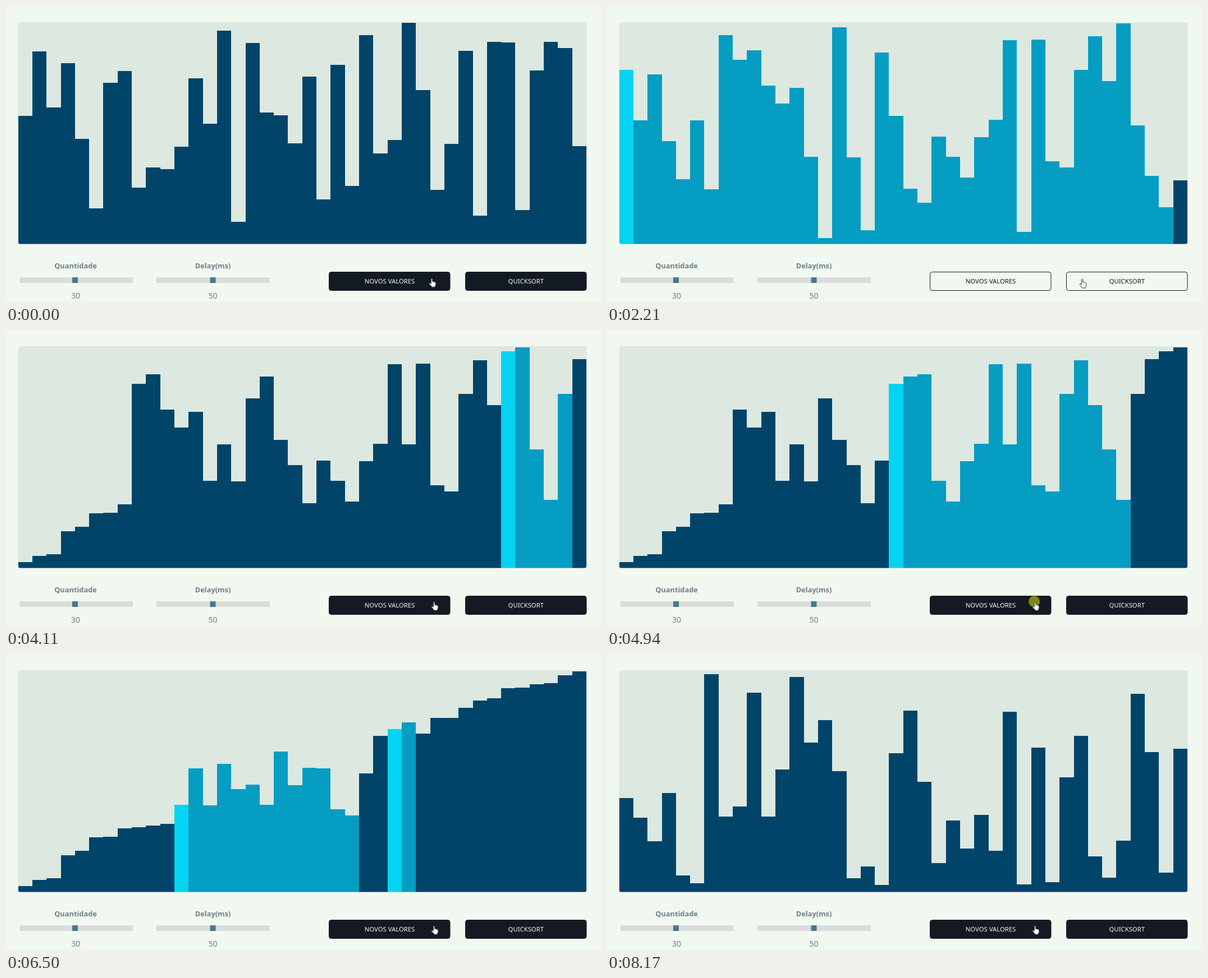
Animation of 1060 by 528 pixels, one loop 8.72 s. Source, as an HTML page:

```html
<!DOCTYPE html>
<html lang="pt">
<head>
<meta charset="utf-8">
<title>Quicksort</title>
<style>
  html, body { margin: 0; width: 100%; height: 100%; overflow: hidden; background: #f1f8f0; }
  svg { display: block; width: 100%; height: 100%; font-family: "Noto Sans", "Open Sans", sans-serif; text-anchor: middle; }
  .label { font-size: 12.8px; font-weight: 700; fill: #6f7f89; }
  .value { font-size: 14px; fill: #6f7f89; }
  .track { fill: #dbdcdb; }
  .thumb { fill: #467890; }
  .btn rect { fill: #141a23; stroke: #141a23; }
  .btn text { font-size: 11.3px; font-weight: 500; fill: #f1f8f0; }

  .cursor, .click, .btn * { animation: 8720ms linear infinite; }
  .cursor { animation-name: move; }
  .click { animation-name: click; animation-timing-function: step-end; opacity: 0; }
  .btn * { animation-timing-function: ease-in-out; }
  .novos rect { animation-name: novos-box; }
  .novos text { animation-name: novos-text; }
  .quick rect { animation-name: quick-box; }
  .quick text { animation-name: quick-text; }

  @keyframes move {
    0% { transform: translate(758.5px, 485.5px); }
    11.6% { transform: translate(758.5px, 485.5px); animation-timing-function: ease-in-out; }
    22.1%, 31% { transform: translate(846.6px, 487px); }
    32.7% { transform: translate(816px, 486.8px); }
    33.43% { transform: translate(791px, 486px); }
    34.75% { transform: translate(770px, 484.6px); }
    36.2%, 100% { transform: translate(762.6px, 484.3px); }
  }
  @keyframes click {
    0%, 6.88%, 25.2%, 58.1%, 93.6%, 100% { opacity: 0; }
    4.58%, 23.8%, 55.8%, 91.35% { opacity: 1; }
  }
  @keyframes novos-box {
    0%, 16.5%, 35.18%, 100% { fill: #141a23; }
    18.2%, 33.46% { fill: #f1f8f0; }
  }
  @keyframes novos-text {
    0%, 16.5%, 35.18%, 100% { fill: #f1f8f0; }
    18.2%, 33.46% { fill: #141a23; }
  }
  @keyframes quick-box {
    0%, 18.46%, 34.35%, 100% { fill: #141a23; }
    20.18%, 32.63% { fill: #f1f8f0; }
  }
  @keyframes quick-text {
    0%, 18.46%, 34.35%, 100% { fill: #f1f8f0; }
    20.18%, 32.63% { fill: #141a23; }
  }
</style>
</head>
<body>
<svg viewBox="0 0 1060 528">
  <clipPath id="panel"><rect x="21.6" y="29" width="1012.8" height="395.6" rx="4"/></clipPath>
  <g clip-path="url(#panel)">
    <rect x="21" y="28" width="1014" height="398" fill="#dce8e0"/>
    <g id="bars" shape-rendering="crispEdges"></g>
  </g>

  <text class="label" x="124" y="468">Quantidade</text>
  <rect class="track" x="24" y="484" width="202" height="10"/>
  <rect class="thumb" x="118" y="484" width="10" height="10"/>
  <text class="value" x="124" y="522">30</text>

  <text class="label" x="368.5" y="468">Delay(ms)</text>
  <rect class="track" x="268" y="484" width="202" height="10"/>
  <rect class="thumb" x="363.5" y="484" width="10" height="10"/>
  <text class="value" x="368.5" y="522">50</text>

  <g class="btn novos">
    <rect x="575.5" y="474.5" width="215.5" height="33" rx="4"/>
    <text x="683.5" y="495">NOVOS VALORES</text>
  </g>
  <g class="btn quick">
    <rect x="818.5" y="474.5" width="215.5" height="33" rx="4"/>
    <text x="926.3" y="495">QUICKSORT</text>
  </g>

  <g class="cursor">
    <circle class="click" cx="-1.5" r="10" fill="#f0ea00" fill-opacity=".52"/>
    <path transform="translate(-5.2 0)" fill="#fff" stroke="#141a23" stroke-width=".9" stroke-linejoin="round"
      d="M4 1.5Q4 .5 5.2 .5T6.4 1.5V6Q7.2 5.4 8.2 6.2Q9.2 5.8 10 6.8Q12.2 6.6 12.4 8.4V11Q12.4 13 11 14.5V16H5V15L1 10.5Q.2 9.2 1.2 8.6Q2.2 8.2 4 10Z"/>
  </g>
</svg>
<script>
  const LOOP = 8720, FRAME = 68, STEP = 55.07, SORT_AT = 2204.4;
  const COLORS = ['#004469', '#059dc1', '#04d4f1']; // idle, in range, pivot slot

  // Top edge of every bar; a larger number is a shorter bar
  const first = [196, 81, 181, 101.5, 236.5, 361, 137, 116, 324, 288, 290.5, 250.5, 129, 210, 44, 384.5, 66, 190, 194.5, 244.5,
    126, 344.5, 105, 321, 52, 263, 238.5, 30, 149.5, 327.5, 245.5, 80, 374, 64, 65, 363.5, 114.5, 64, 75, 250];
  const second = [114, 203.8, 122, 240.5, 309, 204.2, 327, 52, 96, 78.5, 142, 173.5, 145.5, 268.8, 413.5, 37.5, 270, 400, 82.5, 196,
    325.5, 351, 233, 269.2, 305.5, 234, 203, 61, 403, 59.5, 277, 287.5, 113.5, 54, 134, 31, 212.5, 303, 359, 310.5];
  const third = [257, 291.5, 333.5, 248, 394.5, 408.5, 35.5, 289.5, 271.5, 68.5, 290, 206, 41, 158, 118, 209, 399.5, 378.5, 412, 177,
    100.5, 228, 372.5, 296.5, 346.5, 286.5, 351, 102.5, 410.5, 167, 407, 220, 145.5, 360.5, 398.5, 333, 70.5, 175, 390, 169];

  const idle = tops => ({ tops, states: tops.map(() => 0) });

  // Runs both halves of each partition side by side, one swap per tick
  function quicksort(source) {
    const tops = [...source], states = tops.map(() => 0);
    const live = [], history = [];
    const run = task => { if (!task.next().done) live.push(task); };
    const swap = (i, j) => { [tops[i], tops[j]] = [tops[j], tops[i]]; };
    const save = () => history.push({ tops: [...tops], states: [...states] });

    function* sort(lo, hi) {
      if (lo >= hi) return;
      states.fill(1, lo, hi);
      let p = lo;
      states[p] = 2;
      for (let i = lo; i < hi; i++) {
        if (tops[i] <= tops[hi]) continue;
        yield;
        swap(i, p);
        states[p] = 0;
        states[++p] = 2;
      }
      yield;
      swap(p, hi);
      states[p] = 0;
      run(sort(lo, p - 1));
      run(sort(p + 1, hi));
    }

    run(sort(0, tops.length - 1));
    save();
    while (live.length) {
      live.splice(0).forEach(run);
      save();
    }
    return history;
  }

  const before = idle(first), shuffled = idle(second), after = idle(third);
  const history = quicksort(second);

  function sceneAt(t) {
    if (t < 530) return before;
    if (t >= 8100) return after;
    const n = Math.floor((t - 2950) / FRAME);
    const shown = 10 * Math.round((2960 + FRAME * n) / 10);
    const tick = Math.floor((shown - SORT_AT) / STEP);
    return tick < 0 ? shuffled : history[Math.min(tick, history.length - 1)];
  }

  const edge = i => Math.round(21.6 + 25.31 * i);
  const group = document.getElementById('bars');
  const bars = first.map((_, i) => {
    const bar = document.createElementNS('http://www.w3.org/2000/svg', 'rect');
    bar.setAttribute('x', edge(i));
    bar.setAttribute('width', edge(i + 1) - edge(i));
    return group.appendChild(bar);
  });

  let current;
  function draw(now) {
    const scene = sceneAt(now % LOOP);
    if (scene !== current) {
      current = scene;
      bars.forEach((bar, i) => {
        bar.setAttribute('y', scene.tops[i]);
        bar.setAttribute('height', 426 - scene.tops[i]);
        bar.setAttribute('fill', COLORS[scene.states[i]]);
      });
    }
  }

  function loop() {
    draw(performance.now());
    requestAnimationFrame(loop);
  }
  loop();
</script>
</body>
</html>
```
